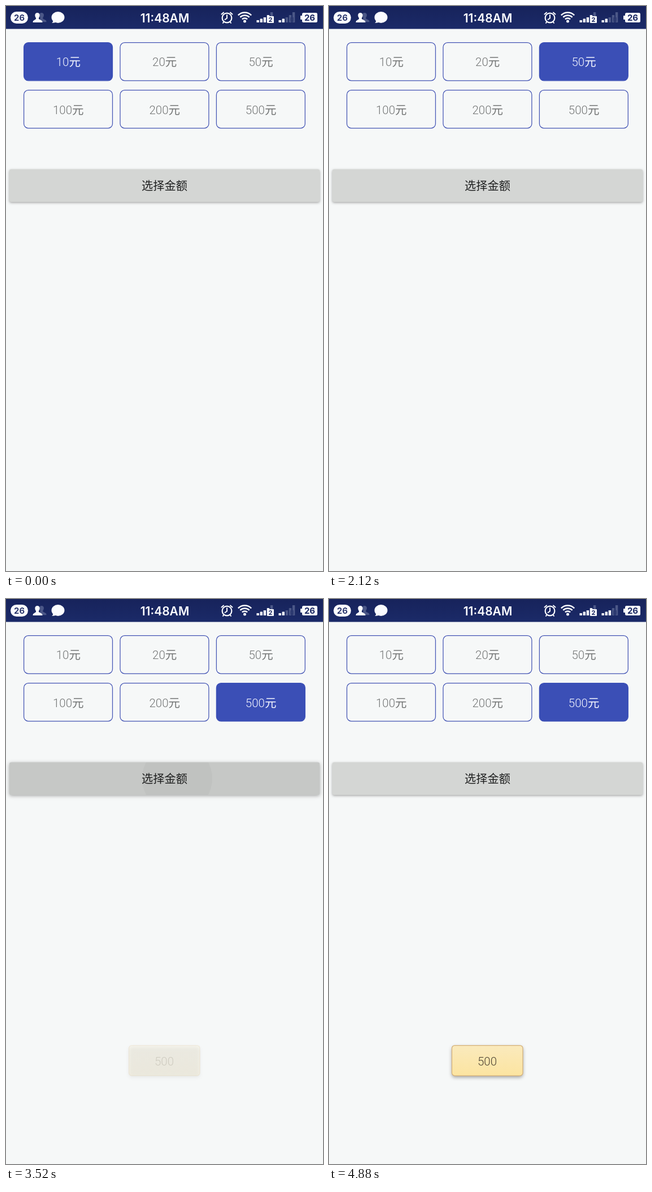
These frames come from a looping animation (561 px wide and 998 px high, 4.92 s). An HTML page with a canvas:

```html
<!DOCTYPE html>
<html lang="zh">
<head>
<meta charset="utf-8">
<style>
html, body { margin: 0; width: 100%; height: 100%; overflow: hidden; background: #f6f8f8; }
canvas { display: block; }
</style>
</head>
<body>
<canvas id="stage" width="561" height="998"></canvas>
<script>
const ctx = document.getElementById('stage').getContext('2d');
const LOOP = 4920, STEP = 40;
const WHITE = '#fbfcff', NAVY = '#1a2762', DIM = '#4b5787', INDIGO = '#3b4fb6';
const LIGHT_FONT = '300 20.5px Roboto, "Noto Sans CJK SC", sans-serif';
const AMOUNTS = [10, 20, 50, 100, 200, 500];
const PICKS = [[0, 0], [1320, 1], [2000, 2], [2680, 5]];
const PRESS = 3400, TOAST = 3440, SIGNAL_UP = 4240;

const progress = (t, start, length) => Math.min(1, Math.max(0, (t - start) / length));

function box(x, y, w, h, r, fill, stroke, line = 1.25) {
  ctx.beginPath();
  ctx.roundRect(x, y, w, h, r);
  if (fill) { ctx.fillStyle = fill; ctx.fill(); }
  if (stroke) { ctx.strokeStyle = stroke; ctx.lineWidth = line; ctx.stroke(); }
}

function label(text, x, baseline, font, color) {
  ctx.font = font;
  ctx.fillStyle = color;
  ctx.textAlign = 'center';
  ctx.fillText(text, x, baseline);
}

function shape(path, fill) {
  ctx.fillStyle = fill;
  ctx.fill(new Path2D(path));
}

function outline(path, color, width) {
  ctx.strokeStyle = color;
  ctx.lineWidth = width;
  ctx.stroke(new Path2D(path));
}

function shadow(color, blur, dy) {
  ctx.shadowColor = color;
  ctx.shadowBlur = blur;
  ctx.shadowOffsetY = dy;
}

function vertical(y0, y1, top, bottom) {
  const g = ctx.createLinearGradient(0, y0, 0, y1);
  g.addColorStop(0, top);
  g.addColorStop(1, bottom);
  return g;
}

function person(x, scale, color) {
  ctx.save();
  ctx.translate(x, 12);
  ctx.scale(scale, scale);
  shape('M0 0C5 0 5 6 2.5 9V11L8 14Q9 15 9 17H-8Q-8 15-7 14L-2.5 11V9C-5 6-5 0 0 0Z', color);
  ctx.restore();
}

function bars(x, count, lit) {
  const heights = [4, 6.5, 9, 13, 18];
  for (let i = 0; i < count; i++) {
    box(x + i * 6.1, 29 - heights[i], 4.4, heights[i], 0.5, i < lit ? WHITE : DIM);
  }
}

function statusBar(t) {
  const small = '700 15px Inter, sans-serif';
  ctx.fillStyle = vertical(0, 40, '#17235b', '#1b2a68');
  ctx.fillRect(0, 0, 561, 40.5);

  box(8, 10, 31, 21, 10.5, WHITE);
  label('26', 23.5, 25.5, '600 15px Inter, sans-serif', NAVY);

  person(63, 0.95, DIM);
  person(55.5, 1, WHITE);

  ctx.fillStyle = WHITE;
  ctx.beginPath();
  ctx.ellipse(92, 20, 11.5, 10, 0, 0, Math.PI * 2);
  ctx.fill();
  shape('M83 24Q84 28 81 30Q86 30 90 28Z', WHITE);

  label('11:48AM', 281, 28.5, '600 21px Inter, sans-serif', WHITE);

  ctx.lineCap = 'round';
  ctx.strokeStyle = WHITE;
  ctx.lineWidth = 2.2;
  ctx.beginPath();
  ctx.arc(391, 21, 8.4, 0, Math.PI * 2);
  ctx.stroke();
  outline('M391 16V21.5L387.5 24M381.5 14.5L385 11.5M400.5 14.5L397 11.5M385.5 28L384 30M396.5 28L398 30', WHITE, 2);

  ctx.lineWidth = 2.5;
  ctx.lineCap = 'butt';
  for (const r of [6.5, 11.5, 16.5]) {
    ctx.beginPath();
    ctx.arc(422.5, 28, r, -Math.PI * 0.75, -Math.PI * 0.25);
    ctx.stroke();
  }
  ctx.beginPath();
  ctx.arc(422.5, 27, 2.5, 0, Math.PI * 2);
  ctx.fillStyle = WHITE;
  ctx.fill();

  bars(443.5, 5, 4);
  box(462, 18, 12, 12, 1, WHITE);
  label('2', 468, 28, '700 11px Inter, sans-serif', NAVY);

  bars(482.5, 5, t >= SIGNAL_UP ? 3 : 2);
  label('H', 506, 28, '700 10px Inter, sans-serif', '#303d73');

  box(524, 12, 27, 17, 2.5, WHITE);
  box(521, 17, 4, 7, 1, WHITE);
  label('26', 537.5, 26, small, NAVY);
}

function amountGrid(t) {
  const picked = PICKS.filter(([start]) => t >= start).pop()[1];
  AMOUNTS.forEach((amount, i) => {
    const x = 31.6 + (i % 3) * 170.4;
    const y = 64.6 + Math.floor(i / 3) * 84.1;
    const on = i === picked;
    box(x, y, 156.9, 67.2, 8, on ? INDIGO : null, on ? INDIGO : '#4354b4');
    label(amount + '元', x + 78.7, y + 41.8, LIGHT_FONT, on ? '#f4f6ff' : '#737575');
  });
}

function chooseButton(t) {
  const pressed = progress(t, PRESS, 80) * (1 - progress(t, 3680, 360));
  ctx.save();
  shadow('rgba(0,0,0,.34)', 4 + 2 * pressed, 1.5);
  box(6, 288.5, 549, 57.5, 3, '#d4d6d4');
  ctx.restore();

  if (pressed > 0) {
    ctx.save();
    ctx.beginPath();
    ctx.roundRect(6, 288.5, 549, 57.5, 3);
    ctx.clip();
    ctx.fillStyle = `rgba(0,0,0,${0.065 * pressed})`;
    ctx.fillRect(6, 288, 549, 59);
    ctx.beginPath();
    ctx.arc(303, 317, 20 + 98 * (t - PRESS) / 280, 0, Math.PI * 2);
    ctx.fillStyle = `rgba(0,0,0,${0.03 * pressed})`;
    ctx.fill();
    ctx.restore();
  }
  label('选择金额', 280.5, 324.5, '400 20.2px "Noto Sans CJK SC", sans-serif', '#1c1d1d');
}

function toast(t) {
  const alpha = progress(t, TOAST, 460);
  if (!alpha) return;
  ctx.save();
  ctx.globalAlpha = alpha;
  shadow('rgba(0,0,0,.36)', 6, 3);
  box(217.5, 788.5, 125.5, 53.5, 5, vertical(788, 842, '#faeabd', '#fce4a0'));
  shadow('transparent', 0, 0);
  box(217.5, 788.5, 125.5, 53.5, 5, null, '#d5b179');
  label('500', 280, 824, LIGHT_FONT, '#4d4333');
  ctx.restore();
}

function draw() {
  const t = Math.floor((performance.now() % LOOP) / STEP) * STEP;
  ctx.fillStyle = '#f6f8f8';
  ctx.fillRect(0, 0, 561, 998);
  statusBar(t);
  amountGrid(t);
  chooseButton(t);
  toast(t);
  requestAnimationFrame(draw);
}
draw();
</script>
</body>
</html>
```
